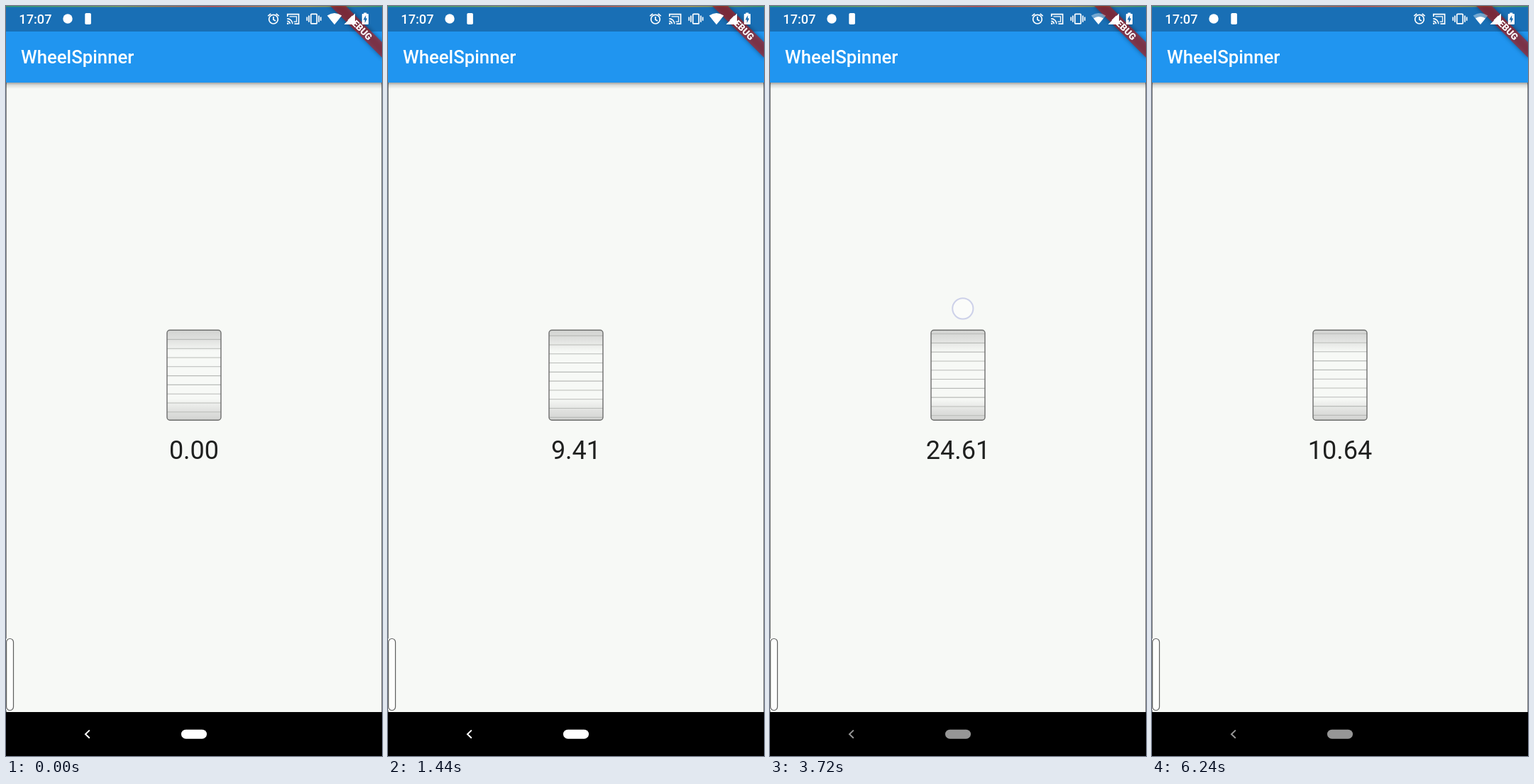
Write an HTML page that moves like this. It is 530 px wide and 1058 px high and loops after 6320 ms.

```html
<!DOCTYPE html>
<html lang="en">
<head>
<meta charset="utf-8">
<title>WheelSpinner</title>
<style>
  html, body { margin: 0; width: 100%; height: 100%; overflow: hidden; background: #f7f9f6; }
  svg { display: block; width: 100%; height: 100%; font-family: Roboto, sans-serif; }
</style>
</head>
<body>
<svg viewBox="0 0 530 1058">
  <defs>
    <linearGradient id="shade" x2="0" y2="1">
      <stop offset="0" stop-color="#d2d3d1"/>
      <stop offset=".1" stop-color="#dfe0de"/>
      <stop offset=".24" stop-color="#f7f9f6"/>
      <stop offset=".76" stop-color="#f7f9f6"/>
      <stop offset=".9" stop-color="#dfe0de"/>
      <stop offset="1" stop-color="#d2d3d1"/>
    </linearGradient>
    <linearGradient id="barShadow" x2="0" y2="1">
      <stop offset="0" stop-opacity=".34"/>
      <stop offset=".4" stop-opacity=".12"/>
      <stop offset="1" stop-opacity="0"/>
    </linearGradient>
    <linearGradient id="topLine">
      <stop offset="0" stop-color="#2f9c74"/>
      <stop offset=".3" stop-color="#7fa05a"/>
      <stop offset=".55" stop-color="#c0504a"/>
      <stop offset=".8" stop-color="#b59a4c"/>
      <stop offset="1" stop-color="#3a9a6a"/>
    </linearGradient>
    <filter id="soft" x="-20%" y="-100%" width="140%" height="300%"><feGaussianBlur stdDeviation="3"/></filter>
    <clipPath id="face"><rect x="227" y="457.3" width="76" height="127" rx="4"/></clipPath>
  </defs>

  <rect width="530" height="1058" fill="#f7f9f6"/>
  <path d="M.5 108V996M529.5 108V996" stroke="#858785"/>
  <rect y="108" width="530" height="9" fill="url(#barShadow)"/>
  <rect width="530" height="108" fill="#2095f0"/>
  <rect width="530" height="36" fill="#196fb5"/>
  <rect width="530" height="1.4" fill="url(#topLine)"/>
  <text x="21" y="81.3" font-size="25.76" font-weight="500" fill="#fff">WheelSpinner</text>

  <g transform="translate(530) rotate(45)">
    <rect x="-52" y="36" width="104" height="15.5" opacity=".4" filter="url(#soft)"/>
    <rect x="-52" y="36" width="104" height="15.5" fill="#b71c1c" fill-opacity=".63"/>
    <text y="48.4" font-size="13.1" font-weight="900" fill="#fff" text-anchor="middle">DEBUG</text>
  </g>

  <g fill="#fff">
    <text x="18.3" y="25" font-size="18.2" font-weight="500">17:07</text>
    <circle cx="87" cy="18" r="6.7"/>
    <rect x="111.3" y="10" width="8.6" height="16" rx="1.8"/>
    <path id="wifiFan" d="M463 26L452.7 13.6Q463 6.4 473.3 13.6Z"/>
    <path d="M463 26L456 17.6Q463 12.6 470 17.6Z"/>
    <path d="M476.5 26H492V10.5Z"/>
    <path fill-rule="evenodd" d="M504.3 9.5H508.3V11H510.3Q511 11 511 12V25Q511 26 510 26H502.8Q501.8 26 501.8 25V12Q501.8 11 502.6 11H504.3ZM507.2 13L503.6 19.4H505.8V24L509.3 17.6H507.2Z"/>
  </g>
  <g fill="none" stroke="#fff" stroke-width="1.7">
    <circle cx="377" cy="18.7" r="6.3"/>
    <path d="M377 15V19.2L380 21M369.3 14.2L373.3 10.8M384.7 14.2L380.7 10.8"/>
    <path d="M396.8 15V11.7H412.6V25.2H406.5M396.3 17.8A7.5 7.5 0 0 1 403.8 25.3M396.3 21.3A4 4 0 0 1 400.3 25.3"/>
    <path d="M399.5 14.8H409.5V22.2H405.5" stroke-width="1.2"/>
    <rect x="429.8" y="11.3" width="8.4" height="13.6" rx="1"/>
    <path d="M427 13.5V22.7M441 13.5V22.7M424.3 15.5V20.7M443.7 15.5V20.7"/>
  </g>
  <circle cx="397.2" cy="24.7" r="1.3" fill="#fff"/>

  <rect x="227" y="457.3" width="76" height="127" rx="4" fill="url(#shade)"/>
  <path id="ridges" clip-path="url(#face)" stroke="#b9bbb8" stroke-width="1.1"/>
  <rect x="227" y="457.3" width="76" height="127" rx="4" fill="none" stroke="#6d6e6d" stroke-width="1.4"/>
  <text id="readout" x="265" y="639" font-size="36" fill="#1f201f" text-anchor="middle"></text>

  <rect x="-6" y="892.5" width="16.5" height="101" rx="5" fill="#fcfdfb"/>
  <rect x=".6" y="892.5" width="9.9" height="101" rx="4.9" fill="#fdfefc" stroke="#5d5e5d" stroke-width="1.2"/>

  <rect y="996" width="530" height="62"/>
  <g id="nav">
    <path d="M117.8 1021.6L112 1027.2L117.8 1032.8" fill="none" stroke="#fff" stroke-width="2"/>
    <rect x="247" y="1020.7" width="36" height="13" rx="6.5" fill="#fff"/>
  </g>

  <circle id="finger" r="14.6" fill="#fff" fill-opacity=".45" stroke="#cdd1e9" stroke-width="2"/>
</svg>
<script>
const LOOP = 6320, STEP = 40;
const UNIT = 25.76;   // finger travel per unit of value
const SLOP = 23;      // travel before the wheel follows
const RIDGE = 12.8;

// Each drag moves the value on from where the previous one left it.
const drags = [
  { start: 252, duration: 820, release: 1320, x: [262, 278], y: 564, to: 9.41 },
  { start: 2360, duration: 640, release: 3080, x: [264, 279], y: 578, to: 19.64 },
  { start: 3360, duration: 700, release: 4140, x: [264, 279], y: 578, to: 30 },
  { start: 4313, duration: 620, release: 5240, x: [258, 275], y: 502, to: 19.71 },
  { start: 5324, duration: 646, release: 6200, x: [280, 273], y: 473.3, to: 10.64 },
];

const $ = id => document.getElementById(id);
const smooth = u => u * u * (3 - 2 * u);

function pose(t) {
  let value = 0, finger = null;
  for (const d of drags) {
    if (t < d.start) break;
    const p = smooth(Math.min(1, (t - d.start) / d.duration));
    const dir = Math.sign(d.to - value);
    const travel = p * (Math.abs(d.to - value) * UNIT + SLOP);
    value += dir * Math.max(0, travel - SLOP) / UNIT;
    finger = t < d.release && { x: d.x[0] + (d.x[1] - d.x[0]) * p, y: d.y - dir * travel };
  }
  return { value, finger };
}

function draw(t) {
  const { value, finger } = pose(t);
  $('readout').textContent = value.toFixed(2);
  let path = '';
  for (let i = 1; i <= 10; i++) path += `M227 ${457.6 + RIDGE * (i - value % 1)}h76`;
  $('ridges').setAttribute('d', path);
  $('finger').style.display = finger ? '' : 'none';
  if (finger) $('finger').setAttribute('transform', `translate(${finger.x} ${finger.y})`);
  $('nav').setAttribute('opacity', t < 1680 ? 1 : 0.59);
  $('wifiFan').setAttribute('opacity', t < 1680 ? 1 : 0.4);
}

function tick() {
  const t = performance.now() % LOOP;
  draw(Math.floor(t / STEP) * STEP);
  requestAnimationFrame(tick);
}
tick();
</script>
</body>
</html>
```
